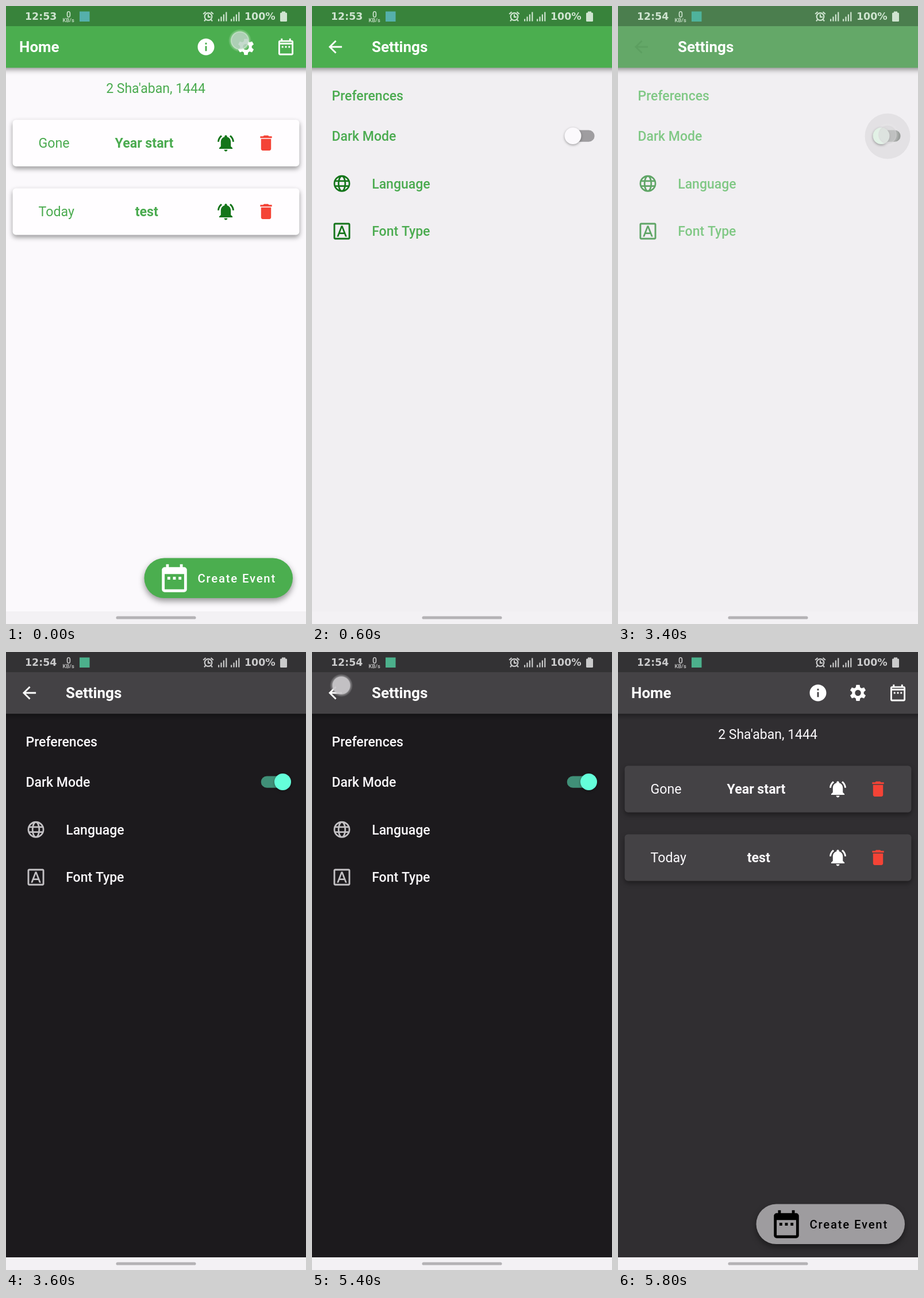
An HTML page with a canvas that plays this animation: 522x1073 px, repeating every 8000 ms.

```html
<!DOCTYPE html>
<html lang="en">
<head>
<meta charset="utf-8">
<title>Event app</title>
<style>
html, body { margin: 0; width: 100%; height: 100%; overflow: hidden; }
canvas { display: block; }
</style>
</head>
<body>
<canvas id="stage" width="522" height="1073"></canvas>
<script>
const W = 522, H = 1073, APP_H = 1051, LOOP = 8000, STEP = 200, ICON = 34.8;
const ctx = document.getElementById('stage').getContext('2d');

const paths = {
  info: 'M12 2C6.48 2 2 6.48 2 12s4.48 10 10 10 10-4.48 10-10S17.52 2 12 2zm1 15h-2v-6h2v6zm0-8h-2V7h2v2z',
  back: 'M20 11H7.83l5.59-5.59L12 4l-8 8 8 8 1.41-1.41L7.83 13H20v-2z',
  bell: 'M7.58 4.08L6.15 2.65C3.75 4.48 2.17 7.3 2.03 10.5h2c.15-2.65 1.51-4.97 3.55-6.42z' +
    'M19.97 10.5h2c-.15-3.2-1.73-6.02-4.12-7.85l-1.42 1.43c2.02 1.45 3.39 3.77 3.54 6.42z' +
    'M18 11c0-3.07-1.64-5.64-4.5-6.32V4c0-.83-.67-1.5-1.5-1.5s-1.5.67-1.5 1.5v.68C7.63 5.36 6 7.92 6 11v5l-2 2v1h16v-1l-2-2z' +
    'M12 22c1.1 0 2-.9 2-2h-4c0 1.1.9 2 2 2z',
  bin: 'M6 19c0 1.1.9 2 2 2h8c1.1 0 2-.9 2-2V7H6zM19 4h-3.5l-1-1h-5l-1 1H5v2h14z',
  calendar: 'M7 11h2v2H7zM11 11h2v2h-2zM15 11h2v2h-2z' +
    'M19 4h-1V2h-2v2H8V2H6v2H5c-1.1 0-2 .9-2 2v14c0 1.1.9 2 2 2h14c1.1 0 2-.9 2-2V6c0-1.1-.9-2-2-2zM19 20H5V9h14z',
  calendarThin: 'M7 11h2v2H7zM11 11h2v2h-2zM15 11h2v2h-2z' +
    'M19 4h-1V2h-2v2H8V2H6v2H5c-1.1 0-2 .9-2 2v14c0 1.1.9 2 2 2h14c1.1 0 2-.9 2-2V6c0-1.1-.9-2-2-2zM19 20H5V9h14zM19 7H5V6h14z',
  letter: 'M4 2h16c1.1 0 2 .9 2 2v16c0 1.1-.9 2-2 2H4c-1.1 0-2-.9-2-2V4c0-1.1.9-2 2-2zM4 4v16h16V4z' +
    'M12.93 5.5h-1.86L5.96 18.5h2.09l1.12-3h5.69l1.14 3h2.09zM9.93 13.5L12 7.98l2.07 5.52z'
};
const icons = {};
for (const name in paths) icons[name] = new Path2D(paths[name]);
icons.gear = makeGear();

const light = {
  bar: '#4bae4f', status: '#cfe4d0', badge: '#55b0ab', home: '#fbf9fc', settings: '#f1eff2',
  card: '#fffdff', text: '#4bab50', bell: '#14751a', pref: '#4bab50', icon: '#14751a',
  arrow: '#fff', fab: '#4bae4f', fabInk: '#fff', track: '#9f9da0', thumb: '#fbf9fc', thumbX: 454
};
const fading = {
  ...light, bar: '#64a868', badge: '#4fb39c', pref: '#80c885', icon: '#5fa566',
  arrow: '#5c9f60', track: '#999d9a', thumb: '#e1f1e5', thumbX: 458
};
const dark = {
  bar: '#444245', status: '#cacacb', badge: '#4cb08c', home: '#302e31', settings: '#1c1a1d',
  card: '#444245', text: '#fbf9fc', bell: '#fff', pref: '#fbf9fc', icon: '#c3c1c4',
  arrow: '#fff', fab: '#9e9c9f', fabInk: '#000', track: '#409078', thumb: '#64ffda', thumbX: 481.5
};

function makeGear() {
  const gear = new Path2D(), corners = [[-22, 7.1], [-12, 9.8], [12, 9.8], [22, 7.1]];
  for (let tooth = 0; tooth < 6; tooth++) {
    for (const [offset, radius] of corners) {
      const a = (tooth * 60 + offset) * Math.PI / 180;
      gear.lineTo(12 + radius * Math.sin(a), 12 - radius * Math.cos(a));
    }
  }
  gear.closePath();
  gear.moveTo(15.6, 12);
  gear.arc(12, 12, 3.6, 0, 2 * Math.PI);
  return gear;
}

function rect(x, y, w, h, color, radius = 0) {
  ctx.fillStyle = color;
  ctx.beginPath();
  ctx.roundRect(x, y, w, h, radius);
  ctx.fill();
}

function circle(x, y, r, color) {
  ctx.fillStyle = color;
  ctx.beginPath();
  ctx.arc(x, y, r, 0, 2 * Math.PI);
  ctx.fill();
}

function shadowed(blur, dy, alpha, draw) {
  ctx.save();
  ctx.shadowColor = `rgba(0,0,0,${alpha})`;
  ctx.shadowBlur = blur;
  ctx.shadowOffsetY = dy;
  draw();
  ctx.restore();
}

function text(str, x, y, size, color, weight = 400, align = 'left', family = 'Roboto') {
  ctx.font = `${weight} ${size}px ${family}, sans-serif`;
  ctx.textAlign = align;
  ctx.fillStyle = color;
  ctx.fillText(str, x, y);
}

function inIconBox(x, y, size, draw) {
  ctx.save();
  ctx.translate(x - size / 2, y - size / 2);
  ctx.scale(size / 24, size / 24);
  draw();
  ctx.restore();
}

function icon(name, x, y, color, size = ICON) {
  inIconBox(x, y, size, () => {
    ctx.fillStyle = color;
    ctx.fill(icons[name], 'evenodd');
  });
}

function globe(x, y, color) {
  inIconBox(x, y, ICON, () => {
    ctx.strokeStyle = color;
    ctx.lineWidth = 1.9;
    ctx.beginPath();
    ctx.arc(12, 12, 9, 0, 2 * Math.PI);
    ctx.moveTo(16, 12);
    ctx.ellipse(12, 12, 4, 9, 0, 0, 2 * Math.PI);
    for (const row of [9, 15]) {
      ctx.moveTo(3.6, row);
      ctx.lineTo(20.4, row);
    }
    ctx.stroke();
  });
}

function appBar(theme, title, x) {
  shadowed(9, 4, 0.42, () => rect(-20, -20, W + 40, 127.3, theme.bar));
  text(title, x, 80.3, 26, '#fff', 600);
}

function eventCard(theme, y, when, name, nameX) {
  shadowed(8, 4, 0.4, () => rect(11.6, y, 498.8, 81, theme.card, 5.8));
  const mid = y + 40.5;
  text(when, 56.5, mid + 8, 23.2, theme.text);
  text(name, nameX, mid + 8, 23.2, theme.text, 700, 'center');
  icon('bell', 382.5, mid, theme.bell);
  icon('bin', 452.5, mid, '#f44336');
}

function homePage(theme) {
  rect(0, 0, W, APP_H, theme.home);
  appBar(theme, 'Home', 23);
  icon('info', 348, 71, '#fff');
  icon('gear', 417.5, 71, '#fff');
  icon('calendarThin', 487, 71, '#fff');
  text("2 Sha'aban, 1444", 260.5, 151, 23, theme.text, 400, 'center');
  eventCard(theme, 197.4, 'Gone', 'Year start', 240.5);
  eventCard(theme, 316.4, 'Today', 'test', 244.8);
  shadowed(11, 5, 0.42, () => rect(240.5, 958.5, 258.5, 69.6, theme.fab, 34.8));
  icon('calendar', 293, 993.5, theme.fabInk, 58);
  ctx.letterSpacing = '1.81px';
  text('Create Event', 333.5, 1000.8, 20.3, theme.fabInk, 500);
  ctx.letterSpacing = '0px';
}

function settingsPage(theme, ripple) {
  rect(0, 0, W, APP_H, theme.settings);
  appBar(theme, 'Settings', 104);
  icon('back', 40.5, 71, theme.arrow);
  text('Preferences', 34.5, 164.3, 23, theme.pref, 500);
  text('Dark Mode', 34.5, 234, 23, theme.pref, 500);
  globe(52, 308.3, theme.icon);
  text('Language', 104.2, 316.6, 23, theme.pref, 500);
  icon('letter', 52, 391, theme.icon);
  text('Font Type', 104.2, 399.2, 23, theme.pref, 500);
  if (ripple) circle(469, 226, 39.5, 'rgba(0,0,0,.06)');
  rect(443.7, 215.5, 47.9, 20.3, theme.track, 10.15);
  shadowed(4, 1.5, 0.35, () => circle(theme.thumbX, 225.6, 14.5, theme.thumb));
}

function zoomed(scale, draw) {
  ctx.save();
  ctx.translate(W / 2, APP_H / 2);
  ctx.scale(scale, scale);
  ctx.translate(-W / 2, -APP_H / 2);
  ctx.beginPath();
  ctx.rect(0, 0, W, APP_H);
  ctx.clip();
  draw();
  ctx.restore();
}

function touch(x, y, fill, ring) {
  const glow = ctx.createRadialGradient(x, y, 14, x, y, 20);
  glow.addColorStop(0, ring);
  glow.addColorStop(1, 'rgba(255,255,255,0)');
  circle(x, y, 20, glow);
  circle(x, y, 15, fill);
  ctx.strokeStyle = ring;
  ctx.lineWidth = 1.5;
  ctx.stroke();
}

function statusBar(theme, clock) {
  const ink = theme.status, techno = 'DejaVu Sans';
  rect(0, 0, W, 35, 'rgba(0,0,0,.25)');
  text(clock, 33, 24.4, 17.4, ink, 700, 'left', techno);
  text('0', 109, 19.5, 14, ink, 500, 'center');
  text('KB/s', 108.7, 28, 9.3, ink, 500, 'center');
  rect(128, 9.5, 17.5, 17.5, theme.badge);
  alarm(352, 18.5, ink);
  for (const left of [369, 391]) {
    [4, 8, 12, 16].forEach((h, i) => rect(left + i * 4.4, 26.5 - h, 2.2, h, ink));
  }
  text('100%', 415, 24.4, 17.4, ink, 700, 'left', techno);
  rect(477, 11.5, 12, 15.5, ink, 1.5);
  rect(480, 9.5, 6, 3, ink);
}

function alarm(x, y, color) {
  ctx.strokeStyle = color;
  ctx.lineWidth = 2.2;
  ctx.beginPath();
  ctx.arc(x, y, 6.3, 0, 2 * Math.PI);
  ctx.moveTo(x, y - 4);
  ctx.lineTo(x, y + 0.7);
  ctx.lineTo(x + 4, y + 0.7);
  for (const side of [-1, 1]) {
    ctx.moveTo(x + side * 8.8, y - 4.5);
    ctx.lineTo(x + side * 4.5, y - 8.3);
    ctx.moveTo(x + side * 5, y + 5.2);
    ctx.lineTo(x + side * 7, y + 7.8);
  }
  ctx.stroke();
}

function render(t) {
  const theme = t < 3400 ? light : t < 3600 ? fading : dark;
  ctx.save();
  ctx.beginPath();
  ctx.rect(0, 0, W, APP_H);
  ctx.clip();
  if (t < 200) {
    homePage(theme);
  } else if (t < 400) {
    zoomed(1.03, () => homePage(theme));
    zoomed(0.96, () => settingsPage(theme));
  } else if (t < 600) {
    rect(0, 0, W, APP_H, theme.settings);
    zoomed(0.998, () => settingsPage(theme));
  } else if (t < 5600) {
    settingsPage(theme, t >= 3400 && t < 3600);
  } else {
    zoomed(t < 5800 ? 1.01 : 1, () => homePage(theme));
  }
  statusBar(theme, t < 3000 ? '12:53' : '12:54');
  if (t < 200) touch(407, 60, 'rgba(180,205,190,.7)', 'rgba(225,240,228,.55)');
  if (t >= 3200 && t < 3400) touch(471, 225, 'rgba(205,203,206,.7)', 'rgba(185,183,186,.5)');
  if (t >= 3400 && t < 3600) touch(469, 223.5, 'rgba(225,225,225,.25)', 'rgba(215,213,216,.45)');
  if (t >= 5400 && t < 5600) touch(51, 58, 'rgba(202,200,203,.85)', 'rgba(200,198,201,.6)');
  ctx.restore();
  rect(0, APP_H, W, H - APP_H, '#f3f1f4');
  rect(191.5, 1059.4, 139, 5.2, '#b4b2b5', 2.6);
}

function tick() {
  const t = performance.now() % LOOP;
  render(Math.floor(t / STEP) * STEP);
  requestAnimationFrame(tick);
}
tick();
</script>
</body>
</html>
```
